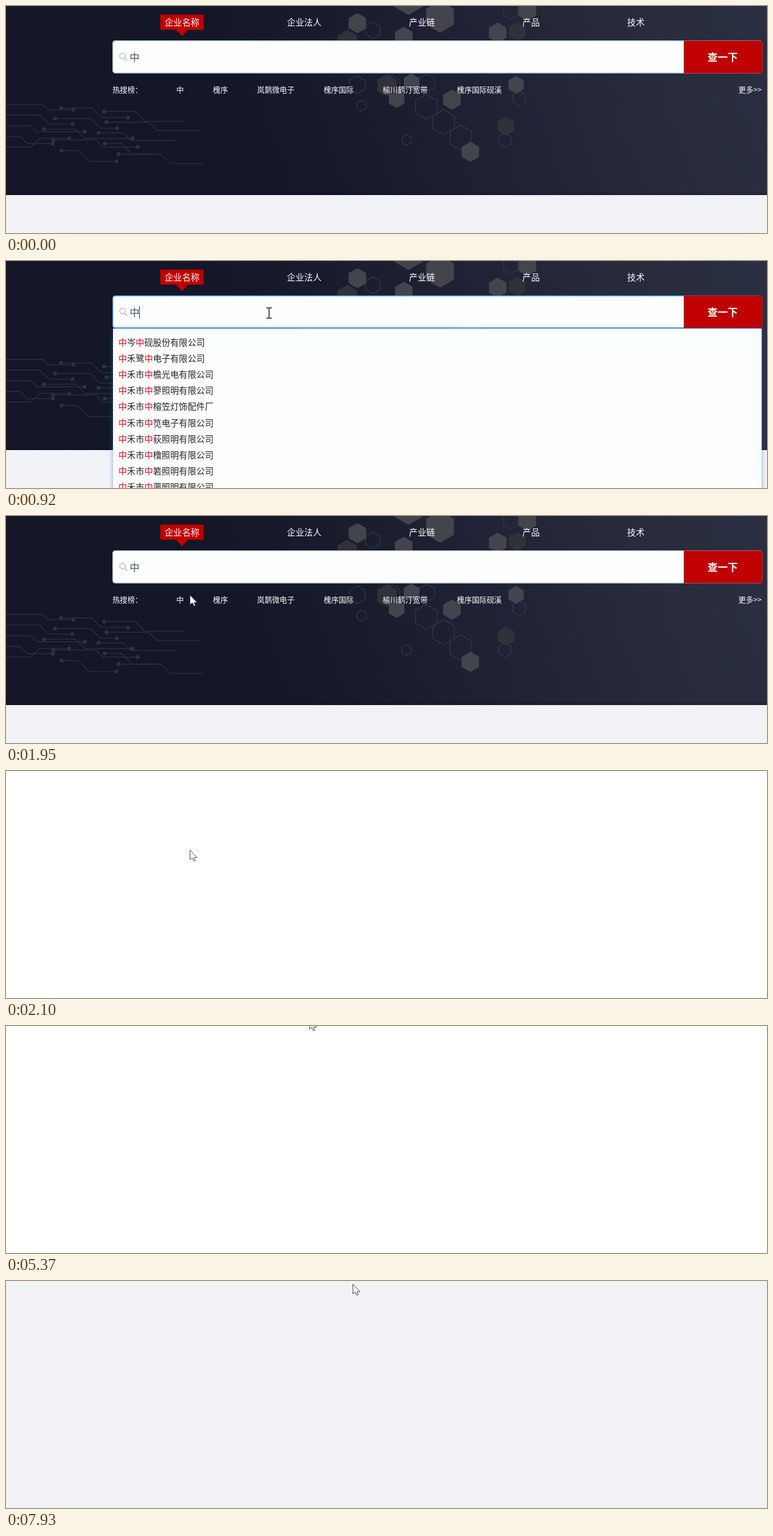
An HTML page for the animation above (8000 ms loop, 1280x383 px).

```html
<!DOCTYPE html>
<html lang="zh-CN">
<head>
<meta charset="utf-8">
<title>企业查询</title>
<style>
  html, body { margin: 0; width: 100%; height: 100%; overflow: hidden; }
  body { position: relative; font-family: "Noto Sans CJK SC", "Noto Sans CJK", sans-serif; }
  svg, #scene { position: absolute; left: 0; top: 0; width: 1280px; height: 383px; overflow: hidden; }
  #scene { background: #f0f2f5; }
  #banner { height: 319px; background:
    linear-gradient(#0000 312px, #0d102055),
    linear-gradient(72deg, #141727 33%, #202335 64%, #282c3c 85%, #2a2f42); }
  #drop { position: absolute; left: 180px; top: 114px; width: 1091px; height: 300px; padding-top: 8.8px;
    box-sizing: border-box; background: #fefefe; transform-origin: top;
    box-shadow: 0 0 7px #4a62d099, inset 0 0 42px #eefeff; }
  .row { height: 27.15px; line-height: 27.15px; padding-left: 9px; font-size: 14.55px; color: #222; white-space: nowrap; }
  .row b { font-weight: 400; color: #e60012; }
  .row.on { background: #0486e0; color: #fff; }
  .wire { fill: none; stroke: #2b2e40; stroke-width: 1.4; }
  .line { fill: none; stroke: #343746; stroke-width: 1.3; }
  .dim { fill: #303239; }
  .lit { fill: #43454d; }
</style>
</head>
<body>
<div id="scene">
  <div id="banner"></div>
  <svg viewBox="0 0 1280 383">
    <defs>
      <marker id="dot" markerUnits="userSpaceOnUse" markerWidth="8" markerHeight="8" refX="4" refY="4">
        <circle cx="4" cy="4" r="3.2" fill="#2f3244"/>
      </marker>
    </defs>
    <g id="art"></g>
    <rect x="259.5" y="14.5" width="73" height="25.5" rx="1.5" fill="#c00000"/>
    <path d="M285 39H307L296 51Z" fill="#c00000"/>
    <rect id="field" x="179.7" y="58.7" width="1092" height="54.3" rx="4" fill="#fefefe" stroke-width="1.4"/>
    <path d="M1140 58.5h128q4.5 0 4.500 4.500v46q0 4.500-4.500 4.500h-128z" fill="#c00000"/>
    <path d="M199.500 88l4.500 4.500M200.700 84.500a4.700 4.700 0 1 0-9.400 0a4.700 4.700 0 1 0 9.400 0" fill="none" stroke="#b4b8c2" stroke-width="1.4"/>
    <path id="caret" d="M224.500 76V97" stroke="#333"/>
    <g id="labels"></g>
  </svg>
  <div id="drop"></div>
</div>
<svg viewBox="0 0 1280 383">
  <circle id="click" r="13" fill="#f0e63c" opacity=".72"/>
  <g id="pointer" stroke="#333" stroke-linejoin="round">
    <path id="arrow" d="M0 0v16l4-3 2.500 5.500 2.500-1-2.500-5H12z" fill="#fff" stroke-width=".9"/>
    <path id="beam" d="M-4.500-8.500h3l1.500 1 1.500-1h3M0-7.500V8M-4.500 9h3L0 8l1.500 1h3" fill="none" stroke="#111" stroke-width="1.4"/>
    <path id="hand" d="M-2 1Q0-2 2 1V7Q10 6 10 11V14Q10 20 6 21H0Q-1 19-3 17L-7 12Q-6 9-2 12Z" fill="#fff"/>
  </g>
</svg>
<script>
const $ = id => document.getElementById(id);
const LOOP = 8000;

function add(parent, tag, attrs, text = '') {
  const el = document.createElementNS('http://www.w3.org/2000/svg', tag);
  for (const key in attrs) el.setAttribute(key, attrs[key]);
  el.textContent = text;
  $(parent).append(el);
}

let seed = 7;
const random = () => (seed = seed * 16807 % 2147483647) / 2147483647;
const between = (a, b) => a + (b - a) * random();

function wire(d, dotAtEnd) {
  add('art', 'path', { d, class: 'wire', 'marker-start': 'url(#dot)', 'marker-end': dotAtEnd ? 'url(#dot)' : '' });
}
// Circuit traces in three columns; each runs flat, bends at 45 degrees, runs flat again.
for (let i = 0; i < 15; i++) {
  const column = i % 3;
  const x = column ? column * 105 - between(0, 60) : -9;
  const bend = between(9, 19);
  const drop = i > 9 && !column ? -bend : bend;
  wire(`M${x} ${166 + i * 6}h${between(25, 75)}l${bend} ${drop}h${between(25, 85)}`, column < 2);
}
wire('M1247 9H1147L1108 47');

function hex(look, r, x, y) {
  const corner = (_, i) => [x + r * Math.sin(i * Math.PI / 3), y + r * Math.cos(i * Math.PI / 3)];
  add('art', 'polygon', { class: look, points: Array.from({ length: 6 }, corner).join(' ') });
}
// A row of equal hexagons between two points.
function chain(look, r, count, x0, y0, x1, y1) {
  for (let i = 0; i < count; i++) {
    const k = i / (count - 1);
    hex(look, r, x0 + (x1 - x0) * k, y0 + (y1 - y0) * k);
  }
}
chain('line', 14, 3, 617, 41, 849, 8);
chain('line', 15, 3, 591, 133, 708, 130);
chain('line', 21, 3, 707, 170, 765, 222);
chain('line', 9, 2, 598, 168, 674, 226);
chain('line', 12, 2, 863, 156, 839, 226);
chain('dim', 19, 2, 574, 59, 641, 134);
chain('dim', 16, 2, 860, 43, 841, 203);
chain('lit', 17, 2, 591, 29, 669, 52);
chain('lit', 27, 2, 677, -12, 730, 18);
chain('lit', 17, 2, 827, 45, 877, 8);
chain('lit', 15, 2, 657, 157, 682, 129);
chain('lit', 17, 2, 750, 158, 781, 246);
hex('lit', 15, 858, 133);

const label = (x, y, size, text, extra) =>
  add('labels', 'text', { x, y, 'font-size': size, fill: '#fff', ...extra }, text);
function labelRow(x, y, size, gap, words) {
  for (const word of words) {
    label(x, y, size, word);
    x += word.length * size + gap;
  }
}
labelRow(267, 33, 14.6, 147, ['企业名称', '企业法人', '产业链', '产品', '技术']);
labelRow(286.5, 146, 12.6, 49, ['中', '槐序', '岚鹊微电子', '槐序国际', '榆川鹤汀宽带', '槐序国际砚溪']);
label(179, 146, 12.6, '热搜榜：');
label(1271, 146, 12.6, '更多>>', { 'text-anchor': 'end' });
label(208, 93, 16.6, '中', { fill: '#3d5368' });
label(1180, 93.2, 17, '查一下', { 'font-weight': 700 });

const town = name => '中禾市中' + name;
const lighting = name => town(name + '照明有限公司');
const companies = ['中岑中砚股份有限公司', '中禾鹭中电子有限公司', town('檐光电有限公司'), lighting('蓼'),
  town('榕笠灯饰配件厂'), town('笕电子有限公司'), ...[...'荻橹箬蕖'].map(lighting)];
$('drop').innerHTML = companies.map(name => `<div class="row">${name.replace(/中/g, '<b>中</b>')}</div>`).join('');
const firstRow = $('drop').firstElementChild;

// Pointer moves: start time, end time, destination; it rests in between.
const entry = [505, 331];
const moves = [
  [70, 680, 442, 87], [1000, 1580, 316, 129], [1750, 1940, 309, 133], [2100, 2480, 462, 93],
  [2600, 3510, 491, -20], [4660, 4740, 511, -14], [5280, 5510, 508, -5], [5700, 5970, 506, -1],
  [6100, 6300, 519, 7], [6300, 6460, 519, -20], [6460, 7660, 592, -20], [7660, 7930, 583, 5]
];
const clamp = k => Math.min(1, Math.max(0, k));
const ease = k => k * k * (3 - 2 * k);
function pointerAt(t) {
  let [x, y] = entry;
  for (const [from, to, toX, toY] of moves) {
    const k = ease(clamp((t - from) / (to - from)));
    x += (toX - x) * k;
    y += (toY - y) * k;
  }
  return [Math.round(x) + 0.5, Math.round(y) + 0.5];
}

const within = (t, a, b) => t >= a && t < b;
const show = (el, on) => { el.style.display = on ? '' : 'none'; };

function draw(t) {
  show($('scene'), t < 2100);
  document.body.style.background = t < 6600 ? '#fff' : '#f0f2f5';

  $('field').setAttribute('stroke', t < 740 ? '#a9cbe8' : t < 1790 ? '#3d97e3' : '#c8ccd8');
  show($('caret'), within(t, 740, 1270));

  const drop = $('drop'), fade = clamp((1945 - t) / 195);
  show(drop, within(t, 920, 1945));
  drop.style.opacity = fade;
  drop.style.transform = `scaleY(${fade})`;

  const [x, y] = pointerAt(t);
  const onRow = within(t, 920, 1880) && y > 123;
  const kind = onRow ? 'hand' : t < 1700 && y < 113 ? 'beam' : 'arrow';
  show($('pointer'), t >= 70);
  $('pointer').setAttribute('transform', `translate(${x} ${y})`);
  for (const id of ['arrow', 'beam', 'hand']) show($(id), id === kind);
  firstRow.classList.toggle('on', onRow);

  $('click').setAttribute('transform', `translate(${x} ${y})`);
  show($('click'), within(t, 690, 800) || within(t, 1640, 1790));
}

const start = performance.now();
function tick() {
  draw((performance.now() - start) % LOOP);
  requestAnimationFrame(tick);
}
tick();
</script>
</body>
</html>
```
